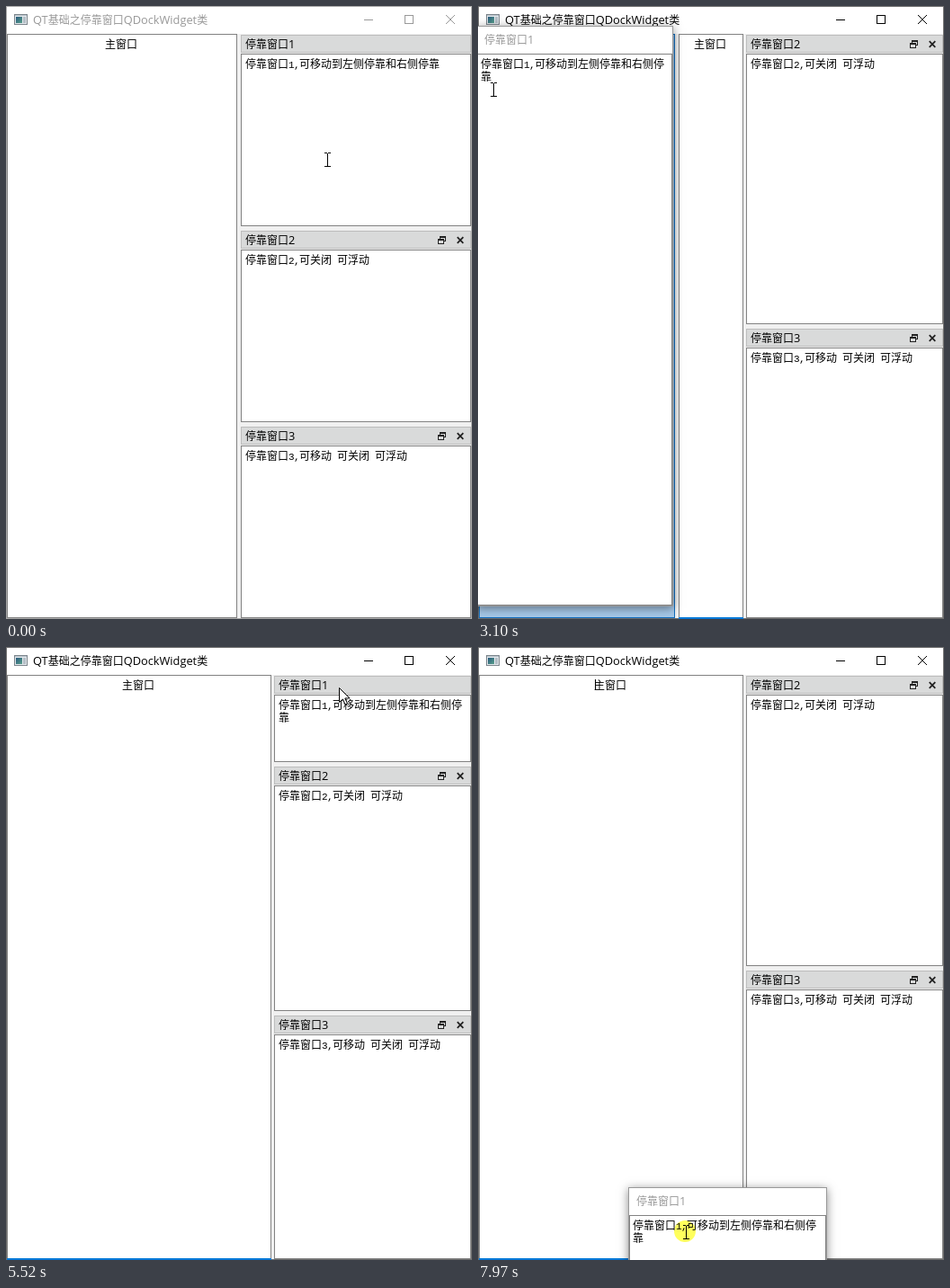
Write an HTML page with a canvas that moves like this. It is 518 by 682 pixels and loops after 8 s.

```html
<!DOCTYPE html>
<html lang="zh-CN">
<head>
<meta charset="utf-8">
<style>
  html, body { margin: 0; width: 518px; height: 682px; overflow: hidden; }
  canvas { display: block; }
</style>
</head>
<body>
<canvas id="stage" width="518" height="682"></canvas>
<script>
const ctx = document.getElementById('stage').getContext('2d');
const LOOP = 8000, TICK = 67.4;
const CJK = '12px "Noto Sans CJK SC", "Noto Sans CJK", sans-serif';
const UI = '12.8px "Open Sans", sans-serif';
const MONO = '11px "Liberation Mono", monospace';
const GREY = '#828282', BLUE = '#0078d7';

// Keyframes start with the tick; values between them are linear.
const cursorKeys = [
  [0, 357, 171], [6, 375, 110], [11, 372, 45], [12, 364, 41], [13, 363, 38], [15, 363, 38],
  [16, 360, 40], [20, 360, 40], [25, 131, 81], [30, 17, 93], [47, 17, 93], [54, 58, 42],
  [58, 58, 42], [66, 303, 75], [69, 332, 63], [76, 332, 63], [82, 370, 45], [85, 370, 45],
  [87, 362, 46], [89, 362, 46], [93, 300, -8], [99, 300, -8], [100, 296, -6],
  [111, 245, 172], [118, 231, 651]
];
// x, y, width, height of the floating window
const floatKeys = [
  [21, 262, 2, 257, 224], [25, 49, 38, 257, 224], [30, -65, 50, 257, 224], [43, -65, 50, 257, 224],
  [46, -2, 22, 219, 646], [48, 0, 9, 219, 660], [59, 10, 18, 219, 680], [66, 246, 34, 219, 680],
  [69, 275, 22, 219, 680], [75, 275, 22, 219, 680], [78, 298, 18, 219, 127],
  [89, 298, 1, 220, 124], [93, 236, -53, 220, 124], [99, 236, -53, 220, 124],
  [100, 232, -51, 220, 124], [111, 181, 126, 220, 124], [118, 167, 601, 221, 124]
];
// main left, main right, dock column left, top of dock 2, top of dock 3
const layoutKeys = [
  [23, 1, 257, 261, 250, 468], [25, 1, 257, 261, 114, 400], [27, 1, 257, 261, 32, 359],
  [28, 1, 257, 261, 32, 359], [30, 223, 295, 298, 32, 359], [60, 223, 295, 298, 32, 359],
  [63, 1, 295, 298, 32, 359], [67, 1, 295, 298, 32, 359], [69, 1, 295, 298, 133, 410],
  [89, 1, 295, 298, 133, 410], [93, 1, 295, 298, 32, 360]
];

function track(keys, tick) {
  const next = keys.findIndex(key => key[0] > tick);
  if (next === 0) return keys[0].slice(1);
  if (next < 0) return keys[keys.length - 1].slice(1);
  const a = keys[next - 1], b = keys[next], p = (tick - a[0]) / (b[0] - a[0]);
  return a.slice(1).map((v, i) => Math.round(v + (b[i + 1] - v) * p));
}
const within = (tick, ...ranges) => ranges.some(([from, to]) => tick >= from && tick <= to);

function fill(x, y, w, h, color) {
  ctx.fillStyle = color;
  ctx.fillRect(x, y, w, h);
}
function box(x, y, w, h, border, inside) {
  fill(x, y, w, h, border);
  fill(x + 1, y + 1, w - 2, h - 2, inside);
}
function lines(color, width, ...paths) {
  ctx.strokeStyle = color;
  ctx.lineWidth = width;
  ctx.beginPath();
  for (const [x, y, ...rest] of paths) {
    ctx.moveTo(x, y);
    for (let i = 0; i < rest.length; i += 2) ctx.lineTo(rest[i], rest[i + 1]);
  }
  ctx.stroke();
}
function cross(x, y, r, color, width) {
  lines(color, width, [x - r, y - r, x + r, y + r], [x + r, y - r, x - r, y + r]);
}

// Interface text: CJK runs and Latin runs in their own fonts
function label(str, x, y, color) {
  ctx.fillStyle = color;
  for (const run of str.match(/[\x20-\x7e]+|[^\x20-\x7e]+/g)) {
    ctx.font = run.charCodeAt(0) < 128 ? UI : CJK;
    ctx.fillText(run, x, y);
    x += ctx.measureText(run).width;
  }
}
// Editor text: full cells of 12 px and half cells of 6 px
function cells(str, x, y) {
  ctx.fillStyle = '#000';
  for (const ch of str) {
    const half = ch.charCodeAt(0) < 128;
    ctx.font = half ? MONO : CJK;
    ctx.fillText(ch, x, y);
    x += half ? 6 : 12;
  }
}
function noteOne(x, y, narrow) {
  const text = '停靠窗口1,可移动到左侧停靠和右侧停靠';
  cells(narrow ? text.slice(0, -1) : text, x, y);
  if (narrow) cells('靠', x, y + 14);
}

function dock(n, x, y, right, bottom, note) {
  box(x, y, right - x, 20, '#bcbcbc', '#d9dada');
  label('停靠窗口' + n, x + 5, y + 15, '#000');
  box(x, y + 21, right - x, bottom - y - 21, GREY, '#fff');
  if (n === 1) return noteOne(x + 5, y + 37, right - x < 240);
  cells(note, x + 5, y + 37);
  const c = y + 10;
  box(482, c - 4, 7, 6, '#222', '#d9dada');
  fill(482, c - 4, 7, 2, '#222');
  box(480, c - 1, 7, 6, '#222', '#d9dada');
  fill(480, c - 1, 7, 2, '#222');
  cross(505, c + .5, 3.3, '#222', 1.8);
}

function frame(active) {
  const ink = active ? '#000' : '#999';
  box(0, 0, 518, 682, active ? '#6e6e6e' : '#a9a9a9', '#f0f0f0');
  fill(1, 1, 516, 30, '#fff');
  box(9, 9, 15, 12, '#7c858c', '#e3e8ec');
  fill(10, 10, 13, 1, '#b9c3cb');
  const tint = ctx.createLinearGradient(11, 12, 18, 19);
  tint.addColorStop(0, '#28587c');
  tint.addColorStop(1, '#58a08c');
  fill(11, 12, 7, 7, tint);
  fill(19, 12, 3, 7, '#b4bec6');
  label('QT基础之停靠窗口QDockWidget类', 30, 20, ink);
  fill(398, 15, 10, 1, ink);
  box(443, 10, 10, 10, ink, '#fff');
  cross(494, 15, 5, ink, 1);
}

function mainPane(left, right, tick) {
  box(left, 31, right - left, 650, within(tick, [20, 29]) ? BLUE : GREY, '#fff');
  if (tick >= 30) fill(left, 680, right - left, 2, BLUE);
  const x = Math.floor((left + right) / 2) - 18;
  cells('主窗口', x - 1, 47);
  if (tick >= 20 && Math.floor((tick * TICK - 1345) / 530) % 2 === 0) fill(x, 36, 1, 12, '#000');
}

function floating(x, y, w, h) {
  ctx.save();
  ctx.shadowColor = 'rgba(0,0,0,.45)';
  ctx.shadowBlur = 10;
  ctx.shadowOffsetY = 2;
  fill(x, y, w, h, '#999');
  ctx.restore();
  fill(x + 1, y + 1, w - 2, h - 2, '#fff');
  label('停靠窗口1', x + 9, y + 20, '#999');
  box(x + 1, y + 31, w - 2, h - 32, GREY, '#fff');
  noteOne(x + 5, y + 47, w < 240);
}

function pointer(x, y, arrow, pressed) {
  if (pressed) {
    ctx.globalCompositeOperation = 'multiply';
    ctx.fillStyle = '#ffff5c';
    ctx.beginPath();
    ctx.arc(x - 1, y - 1, 12, 0, 7);
    ctx.fill();
    ctx.globalCompositeOperation = 'source-over';
  }
  if (!arrow) {
    fill(x, y - 7, 1, 15, '#000');
    for (const dy of [-8, 7]) {
      fill(x - 3, y + dy, 3, 1, '#000');
      fill(x + 1, y + dy, 3, 1, '#000');
    }
    return;
  }
  const shape = new Path2D('M0 0V16L4 12.5L6.5 18.5L9 17.5L6.3 11.5H11.5Z');
  ctx.save();
  ctx.translate(x + .5, y + .5);
  ctx.fillStyle = '#fff';
  ctx.strokeStyle = '#000';
  ctx.lineWidth = 1;
  ctx.fill(shape);
  ctx.stroke(shape);
  ctx.restore();
}

function draw(now) {
  const tick = Math.floor((now % LOOP + 14) / TICK);
  const [left, right, column, top2, top3] = track(layoutKeys, tick);
  frame(tick >= 20);
  mainPane(left, right, tick);
  if (within(tick, [0, 20], [79, 88])) dock(1, column, 32, 517, top2 - 5);
  if (within(tick, [49, 58])) dock(1, 1, 32, 219, 681);
  dock(2, column, top2, 517, top3 - 5, '停靠窗口2,可关闭 可浮动');
  dock(3, column, top3, 517, 681, '停靠窗口3,可移动 可关闭 可浮动');
  if (within(tick, [30, 48], [59, 60])) box(1, 31, 218, 650, '#0f6cbd', '#a6c8e8');
  if (within(tick, [69, 78])) box(298, 32, 219, 96, '#0f6cbd', '#a6c8e8');
  if (within(tick, [21, 48], [59, 78], [89, 118])) floating(...track(floatKeys, tick));
  pointer(...track(cursorKeys, tick),
    within(tick, [11, 20], [51, 58], [79, 101]),
    within(tick, [20, 43], [58, 75], [88, 91], [102, 118]));
  requestAnimationFrame(draw);
}
requestAnimationFrame(draw);
</script>
</body>
</html>
```
